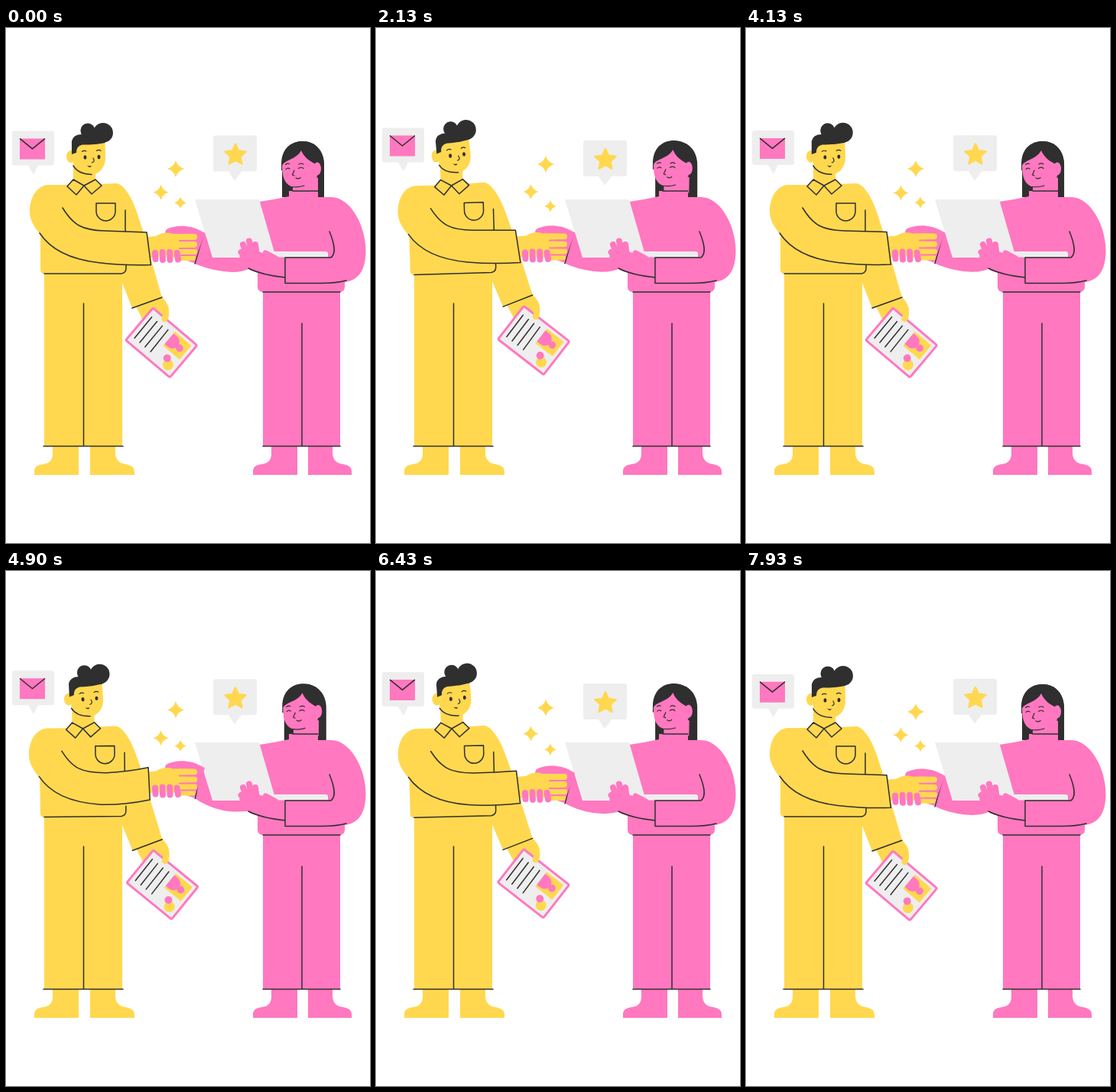
An HTML page that plays this animation: 476 px wide and 673 px high, repeating every 8.01 s.

```html
<!DOCTYPE html>
<html lang="en">
<head>
<meta charset="utf-8">
<title>Handshake</title>
<style>
  html, body { margin: 0; width: 100%; height: 100%; overflow: hidden; background: #fff; }
  svg { display: block; width: 100%; height: 100%; }
  .y { fill: #ffd84f; }
  .p { fill: #ff78c0; }
  .d { fill: #2f2f2f; }
  .g { fill: #eee; }
  .line, .finger { fill: none; stroke-linecap: round; stroke-linejoin: round; }
  .line { stroke: #2f2f2f; stroke-width: 1.5; }
  .thin { stroke-width: 1.2; }
  .finger { stroke-width: 8; }
  .gap { stroke-width: 2; }
  .ys { stroke: #ffd84f; }
  .ps { stroke: #ff78c0; }
</style>
</head>
<body>
<svg viewBox="0 0 476 673">
  <g id="mail">
    <path class="g" d="M11 0H60Q63 0 63 3V42Q63 45 60 45H42L36 57L29 45H11Q8 45 8 42V3Q8 0 11 0Z"/>
    <path class="p" d="M18 10H51V37H18Z"/>
    <path class="line" d="M18.500 10.500L34.500 23.500L50.500 10.500"/>
  </g>
  <g id="award">
    <path class="g" d="M274 0H325Q328 0 328 3V44Q328 47 325 47H308L299 59L291 47H274Q271 47 271 44V3Q271 0 274 0Z"/>
    <path class="y ys" id="star" stroke-width="2.400" stroke-linejoin="round"/>
  </g>
  <g id="sparkles"></g>

  <!-- woman -->
  <path class="p" d="M347 547H381V584H323V578Q324 571 334 570Q347 569 347 556Z"/>
  <path class="p" d="M395 547H427V556Q428 569 441 570Q452 572 452 579V584H395Z"/>
  <path class="p" d="M336 340H437V547H336Z"/>
  <path class="line" d="M387 386V546M336 546.500H437"/>
  <path class="p" id="reach"/>
  <path class="line" id="reachCuff"/>
  <path class="d" id="backHair" d="M361 221V179C361 159 372 148 388 148C404 148 416 160 416 179V221Z"/>
  <path class="p" d="M331 227Q352 224 370 220V213H408V221H425C451 221 470.500 259 470.500 292C470 318 460 330 443 332V338Q443 345 436 345H336Q329 345 329 338V230Z"/>
  <path class="line" d="M336 345H437"/>
  <g id="womanHead">
    <path class="p" d="M375 194H408V216H375Z"/>
    <path class="d" d="M360 186V178C360 158 372 148 388 148C404 148 416 160 416 180L409 196Z"/>
    <path class="p" d="M361 180C364 172 380 172 386 160C390 170 399 175 405 178L408 190C405 204 390 209 377 208C365 206 361 196 361 180Z"/>
    <ellipse class="p" cx="407" cy="184" rx="5" ry="8.500"/>
    <path class="line thin" d="M365.500 178.500Q368 176.500 370.500 177.500M383 178Q386 176 389 178M366 184.500Q368.500 182 371 184M382.500 183.500Q386 181 389 183.500M377 186L374.500 192L377 193M379 196Q382 198 385 195.500M374.500 207.500Q383 208.500 390 206"/>
  </g>
  <path class="line" d="M375 213H408"/>
  <path class="g" d="M247 224H331L353 300H270Z"/>
  <path class="g" d="M345 292H418Q421 292 421 295V299.500H345Z"/>
  <path class="p" d="M305 298Q311 290 330 292L350 299L366 301V331L320 317Q311 311 305 298Z"/>
  <path class="finger ps" d="M307.500 293L315 302M310 283L317 300M318 278.500L322 297M326 283L328 298M339.500 294.500L352 301"/>
  <path class="line" d="M423 266C432 288 430 296 425 300H365V333.500H412Q432 333.500 445 330M317 314Q335 323 365 326"/>

  <!-- man -->
  <path class="y" d="M61 545H95V584H37V578Q38 571 48 570Q61 569 61 556Z"/>
  <path class="y" d="M110 545H143V556Q144 569 157 570Q168 572 168 580V584H110Z"/>
  <path class="y" d="M50 312H152V547H50Z"/>
  <path class="line" d="M101.500 360V546M49 546.500H153"/>

  <g id="hands">
    <path class="p" d="M260 268C242 256 222 257 210 263Q205 269 212 274L225 300L246 307Z"/>
    <path class="y" d="M184 273L196 272Q208 265 218 269H236V303H226L206 294L186 302Z"/>
    <path class="finger ys" d="M222 273H246M224 283H246M226 292.500H246M228 300H244"/>
    <path class="finger gap ps" d="M227 278H250M227 288H250M229 297H248"/>
    <path class="finger ps" d="M195 294L195.500 302M204.500 293L205 303M214 293L214.500 303M223.500 294L225 302.500"/>
    <path class="line ys" d="M200 289V299M209.500 289V299M219 289V299"/>
  </g>

  <g id="torso">
    <path class="y" d="M168 360L202 350Q214 360 213 371Q212 384 203 386L180 384Z"/>
    <g id="paper">
      <rect class="g ps" x="1" y="1" width="75.500" height="55" rx="2" stroke-width="3"/>
      <path class="line" d="M7.500 11L8 46.500M16.500 11L17 46.500M25.500 11L26 46.500M34.500 10L35.500 46.500"/>
      <path class="y" d="M43 6H71V30H43Z"/>
      <path class="p" d="M43 9H49A9 9 0 0 1 49 27H43Z"/>
      <circle class="p" cx="61.500" cy="18.500" r="4.800"/>
      <circle class="y" cx="64" cy="45" r="7"/>
      <circle class="p" cx="57.500" cy="39" r="5"/>
    </g>
    <path class="finger ys" d="M203 362Q212 370 207.500 380"/>
    <path class="y" d="M142 204C160 206 168 230 178 262L204 352L165 366L150 328Z"/>
    <path class="line" d="M165 366L204 352"/>
    <path class="y" d="M82 205H55C40 206 31 222 31 240C31 253 40 264 45 270V316Q45 321 50 321H152Q157 320 157 314L172 262C167 235 160 205 144 203L122 204Z"/>
    <path class="line" d="M50 321H151Q157 320 157 314V308M156 238V266M118 229H143V239.500A12.500 12.500 0 0 1 118 239.500Z"/>
    <path class="y" d="M88 170H117V204L102 212L88 204Z"/>
    <g id="manHead">
      <ellipse class="y" cx="85" cy="168" rx="6" ry="8"/>
      <path class="y" d="M88 147H129Q130 153 130 170C130 183 121 192 110 192C101 192 92 189 88 182Z"/>
      <path class="d" d="M86 165V148Q88 139 99 139L120 136L130 150Q112 153 100 152.500Q92 154 92 163Z"/>
      <circle class="d" cx="107" cy="134" r="9.500"/>
      <circle class="d" cx="127" cy="137" r="13"/>
      <circle class="d" cx="116" cy="142" r="10"/>
      <ellipse class="d" cx="103.500" cy="169" rx="2" ry="2.700"/>
      <ellipse class="d" cx="121.500" cy="168.500" rx="2" ry="2.700"/>
      <path class="line thin" d="M99.500 161.500Q102 159.500 105 161M118.500 160.500Q121.500 158.500 124 160.500M114 170Q117 175 112.500 176"/>
      <path class="line" d="M88 180Q94 191 112 191.500"/>
      <path class="d" d="M106 179.500Q109 181 112 180Q110 184.500 106 179.500Z"/>
    </g>
    <path class="y" d="M88 198L80 207L92 218L102 206L112 217L125 206L117 198L102 206Z"/>
    <path class="line" d="M88 198L80 207L92 218L102 206L112 217L125 206L117 198M88 198L102 206L117 198"/>
    <path class="y" id="arm"/>
    <path class="line" id="armLines"/>
  </g>
</svg>
<script>
  const LOOP = 8010;
  const TURN = 2 * Math.PI;
  const $ = id => document.getElementById(id);
  const wave = p => Math.cos(TURN * p);
  const ease = p => (1 - wave(p)) / 2;
  const set = (id, name, value) => $(id).setAttribute(name, value);
  const move = (id, x, y) => set(id, 'transform', `translate(${x} ${y})`);

  const starPoints = Array.from({ length: 10 }, (_, i) => {
    const r = i % 2 ? 6.8 : 14.2, a = TURN * i / 10;
    return `${300 + r * Math.sin(a)} ${25.500 - r * Math.cos(a)}`;
  });
  set('star', 'd', `M${starPoints.join('L')}Z`);

  // x, mean y, radius, swing, phase of the lowest point
  const sparkles = [
    [222, 181, 11, 3, 0],
    [202.500, 214.700, 10, 3.500, 0.25],
    [228, 230.500, 7.800, 2.700, 0.61]
  ].map(([x, y, r, swing, phase]) => {
    const el = document.createElementNS('http://www.w3.org/2000/svg', 'path');
    const k = r * 0.23;
    el.setAttribute('class', 'y');
    el.setAttribute('d', `M0 ${-r}Q${k} ${-k} ${r} 0Q${k} ${k} 0 ${r}Q${-k} ${k} ${-r} 0Q${-k} ${-k} 0 ${-r}Z`);
    $('sparkles').append(el);
    return { el, x, y, swing, phase };
  });

  function drawManArm(shake) {
    const top = `${184 + 3 * shake} ${267 - 9.5 * shake}`;
    const bottom = `${189.5 - shake} ${309.5 - 9.7 * shake}`;
    const elbow = `${120 + 4 * shake} ${306.5 - shake}`;
    const bend = `${152 + 2 * shake} ${310.5 - 4 * shake}`;
    const upper = `M74 235C88 258 100 264 ${128 + 4 * shake} ${265 - shake}Q${158 + 2 * shake} ${266 - 3 * shake} ${top}L${bottom}`;
    set('arm', 'd', `${upper}Q${bend} ${elbow}C82 302 58 289 44 268Z`);
    set('armLines', 'd', `${upper}M44 268C58 289 82 302 ${elbow}Q${bend} ${bottom}`);
  }

  function drawWomanArm(shake) {
    const top = `${258.5 - 3 * shake} ${268 - 12 * shake}`;
    const bottom = `${247 + 0.3 * shake} ${308 - 11 * shake}`;
    set('reach', 'd', `M${top}L${bottom}Q${270 - shake} ${318 - 6 * shake} ${295 - 2 * shake} ${319 - 5 * shake}Q312 ${319 - 4 * shake} 320 313L345 250Z`);
    set('reachCuff', 'd', `M${top}L${bottom}`);
  }

  function draw(t) {
    const p = t / (LOOP / 2);
    const lean = ease(p);
    const nod = ease(p + 0.045);
    const shake = ease(2 * p);
    const sway = 1 - (1 - lean) ** 2;

    move('mail', 0, 132.2 + 3.2 * wave(p - 0.87));
    move('award', 0, 143.5 - 3.5 * wave(p - 0.09));
    for (const s of sparkles)
      s.el.setAttribute('transform', `translate(${s.x} ${s.y + s.swing * wave(p - s.phase)})`);

    set('torso', 'transform', `rotate(${-1.65 * lean} 101 325)`);
    set('paper', 'transform', `translate(192 364.5) rotate(${40.2 - 0.8 * lean})`);
    set('manHead', 'transform', `translate(0 ${-2.2 * nod}) rotate(${-3.6 * nod} 103 200)`);
    drawManArm(shake);

    move('hands', 0, -10.8 * shake);
    drawWomanArm(shake);
    set('womanHead', 'transform', `translate(${1.4 * sway} ${-sway}) rotate(${sway} 388 212)`);
    move('backHair', 4.2 * sway, 0);
  }

  function frame() {
    draw(performance.now() % LOOP);
    requestAnimationFrame(frame);
  }
  frame();
</script>
</body>
</html>
```
